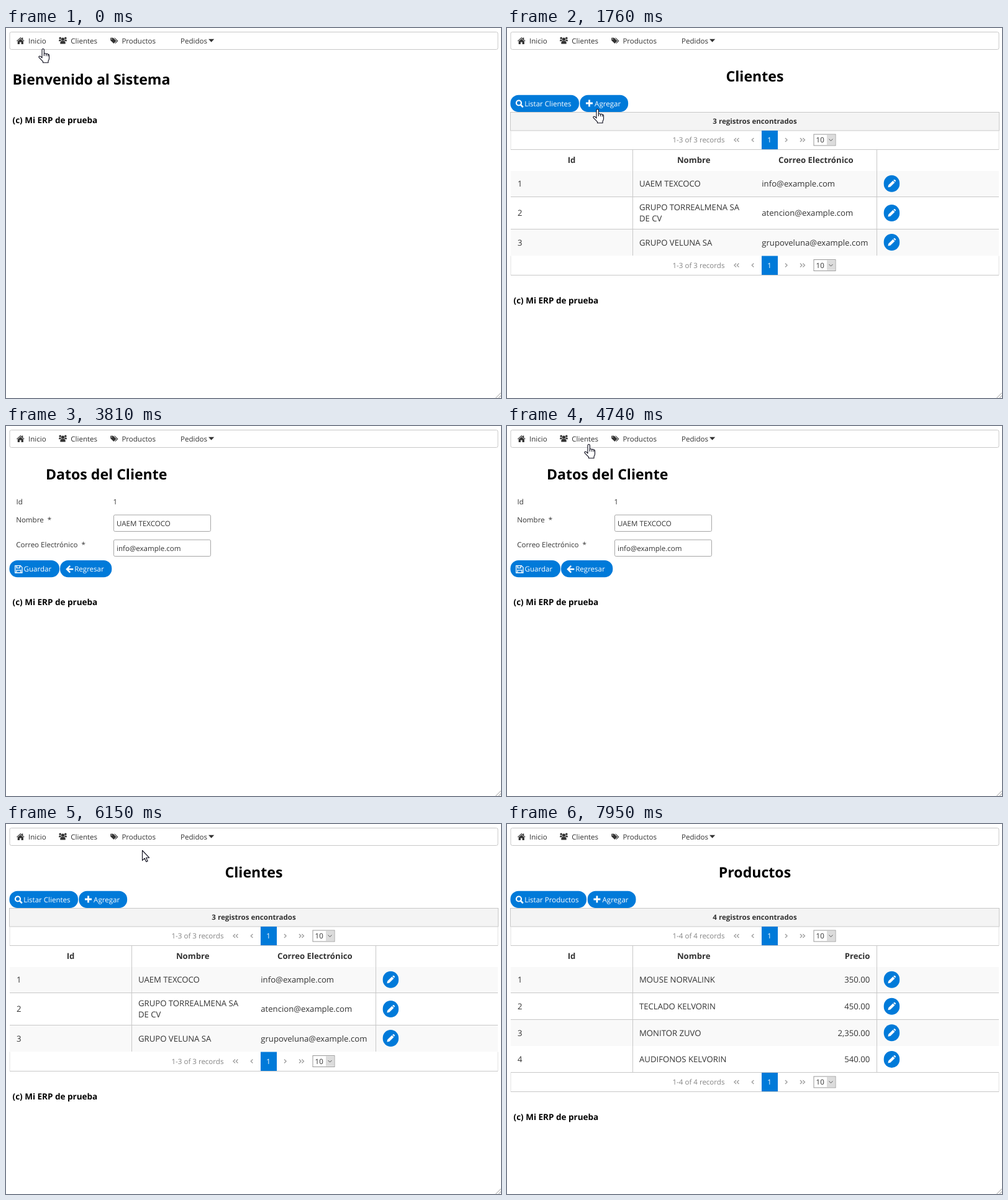
Animation of 797 by 595 pixels, one loop 8000 ms. Source, as an HTML page:

```html
<!DOCTYPE html>
<html lang="es">
<head>
<meta charset="utf-8">
<title>Mi ERP de prueba</title>
<style>
html, body { margin: 0; width: 100%; height: 100%; overflow: hidden; background: #fff; }
svg { display: block; }
text { font: 11.55px "Open Sans", sans-serif; fill: #333; text-rendering: geometricPrecision; white-space: pre; }
.h1 { font-size: 23.1px; font-weight: 700; fill: #000; }
.h3 { font-size: 13.5px; font-weight: 700; fill: #000; }
.bold { font-weight: 700; }
.cells text { font-size: 13.15px; }
.mid { text-anchor: middle; }
.end { text-anchor: end; }
.gray { fill: #848484; }
.white { fill: #fff; }
.blue { fill: #007ad9; }
.odd { fill: #f9f9f9; }
.line { fill: none; stroke: #c8c8c8; }
.soft { fill: none; stroke: #e2e2e2; }
.input { fill: #fff; stroke: #a6a6a6; }
.icon { fill: none; stroke: #fff; }

.page, #tip, #press, #cursor, #arrow, #hand { animation: 8s step-end infinite; }
#home { animation-name: home; }
#clients { animation-name: clients; }
#form { animation-name: form; }
#products { animation-name: products; }
#tip { animation-name: tip; }
#press { animation-name: press; }
#cursor { animation-name: move; }
#arrow { animation-name: arrow; }
#hand { animation-name: hand; }

@keyframes home { 0% { opacity: 1 } 14.125%, 100% { opacity: 0 } }
@keyframes clients { 0%, 44.5%, 86.875%, 100% { opacity: 0 } 14.125%, 73.125% { opacity: 1 } }
@keyframes form { 0%, 73.125%, 100% { opacity: 0 } 44.5% { opacity: 1 } }
@keyframes products { 0% { opacity: 0 } 86.875%, 100% { opacity: 1 } }
@keyframes tip { 0%, 39.5%, 100% { opacity: 0 } 35.5% { opacity: 1 } }
@keyframes press { 0%, 41.625%, 100% { opacity: 0 } 40.5% { opacity: 1 } }

@keyframes arrow {
  0%, 7%, 31.625%, 59.25%, 77.875%, 99.375%, 100% { opacity: 0 }
  1.875%, 22.875%, 49.5%, 73.125%, 92.875% { opacity: 1 }
}
@keyframes hand {
  0%, 7%, 16%, 31.625%, 59.25%, 77.875%, 91.75% { opacity: 1 }
  1.875%, 14.125%, 22.875%, 45.5%, 73.125%, 87.75%, 92.875%, 100% { opacity: 0 }
}
@keyframes move {
  0% { transform: translate(60px, 33px) }
  .875% { transform: translate(58px, 33px) }
  1.875% { transform: translate(57px, 42px) }
  2.875% { transform: translate(62px, 47px); animation-timing-function: steps(5) }
  8% { transform: translate(123px, 28px) }
  9.125% { transform: translate(122px, 24px) }
  11.125% { transform: translate(122px, 18px) }
  12.125% { transform: translate(122px, 14px) }
  16% { transform: translate(98px, 130px) }
  18.875% { transform: translate(104px, 130px); animation-timing-function: steps(3) }
  22% { transform: translate(146px, 130px) }
  22.875% { transform: translate(172px, 146px); animation-timing-function: steps(4) }
  26.875% { transform: translate(482px, 314px) }
  27.875% { transform: translate(566px, 318px) }
  28.875% { transform: translate(613px, 265px) }
  29.75% { transform: translate(617px, 265px) }
  31.625% { transform: translate(619px, 257px) }
  49.5% { transform: translate(371px, 202px) }
  51.375% { transform: translate(364px, 198px); animation-timing-function: steps(8) }
  59.25% { transform: translate(132px, 29px) }
  62.25% { transform: translate(133px, 27px) }
  63.25% { transform: translate(134px, 26px) }
  67% { transform: translate(140px, 223px) }
  69.125% { transform: translate(100px, 227px) }
  70.125% { transform: translate(63px, 230px) }
  73.125% { transform: translate(75px, 205px); animation-timing-function: steps(4) }
  76.875% { transform: translate(219px, 42px) }
  77.875% { transform: translate(216px, 33px); animation-timing-function: steps(3) }
  81% { transform: translate(209px, 22px) }
  85% { transform: translate(209px, 19px) }
  86% { transform: translate(209px, 17px) }
  91.75% { transform: translate(173px, 126px) }
  92.875% { transform: translate(180px, 137px); animation-timing-function: steps(5) }
  98.25%, 100% { transform: translate(267px, 173px) }
}
</style>
</head>
<body>
<svg width="797" height="595" viewBox="0 0 797 595">
  <defs>
    <path id="pencil" class="white" d="M-6 6l.8-3.8L2-4.8l3 3L-2.2 5.2zM2.8-5.5l.9-.8q.8-.6 1.5 0l1.1 1.1q.6.7 0 1.5l-.7.9z"/>
    <g id="edit">
      <rect class="blue" x="-12.7" y="-13.5" width="25.4" height="27" rx="12.7"/>
      <use href="#pencil"/>
    </g>
    <g id="search" class="icon">
      <circle cx="19" cy="120.5" r="4" stroke-width="2.2"/>
      <path d="M22 123.5l3.8 3.8" stroke-width="2.6"/>
    </g>
    <g id="add">
      <rect class="blue" y="107.7" width="77.8" height="27.3" rx="13"/>
      <path class="icon" d="M9.7 121H20.7M15.2 115.5v11" stroke-width="2.8"/>
      <text class="white" x="23.8" y="126">Agregar</text>
    </g>
    <g id="pager">
      <path class="soft" d="M6 0v30.5M792 0v30.5"/>
      <g fill="none" stroke="#a3a3a3" stroke-width="1.5">
        <path d="M369 12l-3 3 3 3M373.4 12l-3 3 3 3M397.3 12l-3 3 3 3M448 12l3 3-3 3M472 12l3 3-3 3M476.4 12l3 3-3 3"/>
      </g>
      <rect class="blue" x="410" width="26" height="30.5"/>
      <text class="white mid" x="422.6" y="19.2">1</text>
      <rect x="494" y="6" width="35" height="18" fill="#fff" stroke="#999"/>
      <rect x="515" y="7" width="13" height="16" fill="#dcdcdc"/>
      <path d="M518.5 13.5l3 3 3-3" fill="none" stroke="#555"/>
      <text x="497.6" y="19.2">10</text>
    </g>
    <g id="list">
      <rect x="5.5" y="135.5" width="787" height="29.5" fill="#f4f4f4" stroke="#c8c8c8"/>
      <use href="#pager" y="165"/>
      <path class="line" d="M6 195.5H792"/>
      <g class="cells">
        <text class="bold mid" x="104" y="217">Id</text>
        <text class="bold mid" x="300.7" y="217">Nombre</text>
      </g>
    </g>
  </defs>

  <rect class="line" x="6" y="6.5" width="786" height="28" rx="2.5"/>
  <g fill="#333">
    <path d="M17 20.8L23.3 15l2.2 2v-1.4h1.8v3.2l2.3 2-.8.8-5.5-5.1-5.5 5.1zM18.7 21.6l4.6-4.2 4.6 4.2V26h-3.3v-3.2H22V26h-3.3z"/>
    <circle cx="91.5" cy="18" r="2.6"/>
    <circle cx="87.2" cy="16.3" r="1.7"/>
    <circle cx="95.8" cy="16.3" r="1.7"/>
    <path d="M87.3 25.6q-.4-4.4 2.4-4.8h3.6q2.8.4 2.4 4.8zM85 21.2q-.1-2.7 1.4-2.8l2 .3.7 1.6-1.6.9zM98 21.2q.1-2.7-1.4-2.8l-2 .3-.7 1.6 1.6.9z"/>
    <path d="M168.2 15.8h4.3l5.2 5-4.2 4.3-5.3-5.2zM174 15.8h1.2l5.2 5-4.2 4.3-.8-.7 3.3-3.6z"/>
    <path d="M326 17.8h9.2l-4.6 5z"/>
  </g>
  <circle class="white" cx="170.2" cy="17.8" r=".8"/>
  <text x="36" y="24.8">Inicio</text>
  <text x="104.3" y="24.8">Clientes</text>
  <text x="186.4" y="24.8">Productos</text>
  <text x="281" y="24.8">Pedidos</text>
  <path d="M788.5 595l8.5-8.5M793 595l4-4" stroke="#999" fill="none"/>

  <g id="home" class="page">
    <text class="h1" x="10.6" y="91">Bienvenido al Sistema</text>
    <text class="h3" x="10.6" y="153">(c) Mi ERP de prueba</text>
  </g>

  <g id="clients" class="page">
    <text class="h1 mid" x="399" y="86">Clientes</text>
    <rect class="blue" x="5.5" y="107.7" width="110.5" height="27.3" rx="13"/>
    <use href="#search"/>
    <text class="white" x="28.2" y="126">Listar Clientes</text>
    <use href="#add" x="117.3"/>
    <use href="#list"/>
    <text class="bold mid" x="399" y="154">3 registros encontrados</text>
    <text class="gray" x="266.5" y="184.2">1-3 of 3 records</text>
    <path class="odd" d="M6 230H792v41H6zM6 324H792v42H6z"/>
    <path class="line" d="M6 271.5H792M6 323.5H792M202.5 195V366M595.5 195V366"/>
    <g class="cells">
      <text class="bold mid" x="497.3" y="217">Correo Electrónico</text>
      <text x="17" y="255">1</text>
      <text x="213" y="255">UAEM TEXCOCO</text>
      <text x="410.3" y="255">info@example.com</text>
      <text x="17" y="302">2</text>
      <text x="213" y="293">GRUPO TORREALMENA SA</text>
      <text x="213" y="311">DE CV</text>
      <text x="410.3" y="302">atencion@example.com</text>
      <text x="17" y="350">3</text>
      <text x="213" y="350">GRUPO VELUNA SA</text>
      <text x="410.3" y="350">grupoveluna@example.com</text>
    </g>
    <use href="#edit" x="619.4" y="250.3"/>
    <use href="#edit" x="619.4" y="297.5"/>
    <use href="#edit" x="619.4" y="344.5"/>
    <use href="#pager" y="366.5"/>
    <text class="gray" x="266.5" y="385.9">1-3 of 3 records</text>
    <path class="line" d="M6 397.5H792"/>
    <text class="h3" x="10.6" y="443">(c) Mi ERP de prueba</text>
    <g id="press">
      <rect x="606.7" y="236.8" width="25.4" height="27" rx="12.7" fill="#005b9f"/>
      <use href="#pencil" x="619.4" y="250.3"/>
    </g>
  </g>

  <g id="form" class="page">
    <text class="h1" x="64" y="86">Datos del Cliente</text>
    <text x="16.6" y="126">Id</text>
    <text x="172.4" y="126">1</text>
    <text x="16.2" y="155">Nombre  *</text>
    <text x="16.2" y="195">Correo Electrónico  *</text>
    <rect class="input" x="173.5" y="143" width="156" height="26.5" rx="2"/>
    <rect class="input" x="173.5" y="183" width="156" height="26.5" rx="2"/>
    <text x="178" y="161">UAEM TEXCOCO</text>
    <text x="178" y="201">info@example.com</text>
    <rect class="blue" x="5.5" y="216" width="80.5" height="27.3" rx="13"/>
    <rect class="blue" x="87" y="216" width="83.3" height="27.3" rx="13"/>
    <path class="icon" d="M14.7 224.7h8.6l2.7 2.7v8.6H14.7zM17.2 225v3.4h5V225M17 236v-4.2h6.8v4.2" stroke-width="1.3"/>
    <path class="icon" d="M108.3 230.2H99M103.2 224.8l-5.3 5.4 5.3 5.4" stroke-width="2.4"/>
    <text class="white" x="28.5" y="234.3">Guardar</text>
    <text class="white" x="110.2" y="234.3">Regresar</text>
    <text class="h3" x="10.6" y="288">(c) Mi ERP de prueba</text>
  </g>

  <g id="products" class="page">
    <text class="h1 mid" x="399" y="86">Productos</text>
    <rect class="blue" x="5.5" y="107.7" width="122.5" height="27.3" rx="13"/>
    <use href="#search"/>
    <text class="white" x="28.2" y="126">Listar Productos</text>
    <use href="#add" x="129.7"/>
    <use href="#list"/>
    <text class="bold mid" x="399" y="154">4 registros encontrados</text>
    <text class="gray" x="266.5" y="184.2">1-4 of 4 records</text>
    <path class="odd" d="M6 230H792v41H6zM6 315H792v42H6z"/>
    <path class="line" d="M6 271.5H792M6 314.5H792M6 399.5H792M202.5 195V399M595.5 195V399"/>
    <g class="cells">
      <text class="bold end" x="584.3" y="217">Precio</text>
      <text x="17" y="255">1</text>
      <text x="213" y="255">MOUSE NORVALINK</text>
      <text class="end" x="584.3" y="255">350.00</text>
      <text x="17" y="298">2</text>
      <text x="213" y="298">TECLADO KELVORIN</text>
      <text class="end" x="584.3" y="298">450.00</text>
      <text x="17" y="341">3</text>
      <text x="213" y="341">MONITOR ZUVO</text>
      <text class="end" x="584.3" y="341">2,350.00</text>
      <text x="17" y="383">4</text>
      <text x="213" y="383">AUDIFONOS KELVORIN</text>
      <text class="end" x="584.3" y="383">540.00</text>
    </g>
    <use href="#edit" x="619.4" y="250.3"/>
    <use href="#edit" x="619.4" y="293.3"/>
    <use href="#edit" x="619.4" y="335.7"/>
    <use href="#edit" x="619.4" y="378.5"/>
    <use href="#pager" y="400"/>
    <text class="gray" x="266.5" y="419.2">1-4 of 4 records</text>
    <path class="line" d="M6 430.5H792"/>
    <text class="h3" x="10.6" y="476">(c) Mi ERP de prueba</text>
  </g>

  <g id="cursor" fill="#fff" stroke="#0c0c1c" stroke-width="1.1" stroke-linejoin="round">
    <path id="arrow" d="M.5.5v16.2l3.7-3.5 2.6 5.6 2.3-1-2.5-5.6h5z"/>
    <g id="hand">
      <path d="M-2 15V2.2a1.7 1.7 0 0 1 3.4 0v6.2q1.7-1.6 3.3.4 1.7-1.3 3 .7 1.8-.6 1.8 1.6v5q0 2-1.5 4v2.7h-8.5v-2l-6.1-6.1q-1.2-1.7.4-2.4 1.3-.4 2.4.8z"/>
      <path d="M1.4 8v4M4.7 8.8v3.4M7.7 9.6v3" fill="none"/>
    </g>
  </g>

  <g id="tip">
    <rect x="617.5" y="278.5" width="43" height="21" fill="#fff" stroke="#767676"/>
    <text x="623" y="294" style="font-size:11.2px;fill:#000">Editar</text>
  </g>
</svg>
</body>
</html>
```
